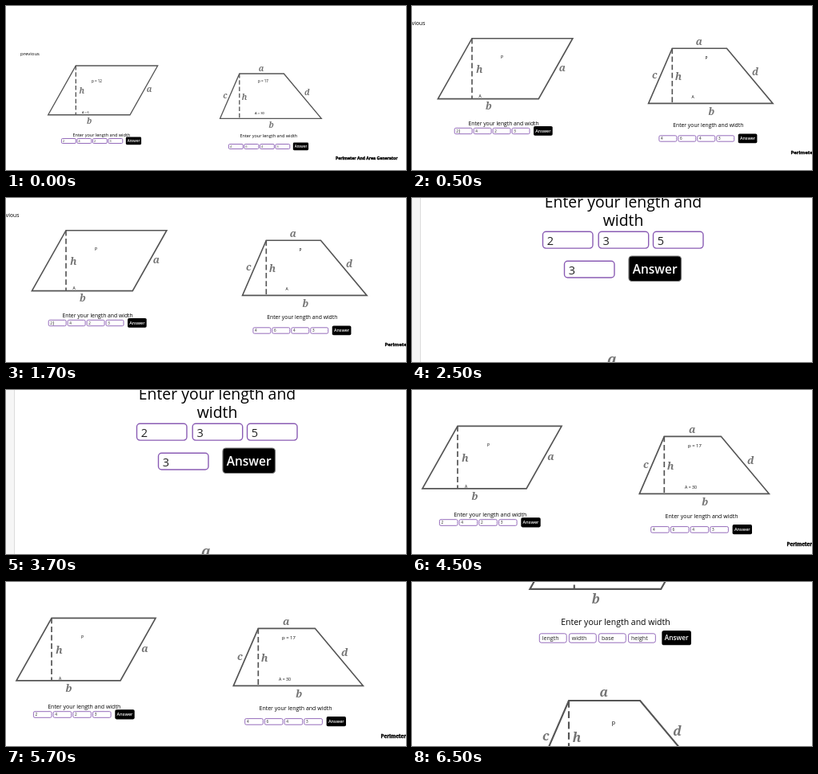
Write an HTML page that moves like this. It is 500 px wide and 206 px high and loops after 8000 ms.

```html
<!DOCTYPE html>
<html lang="en">
<head>
<meta charset="utf-8">
<title>Perimeter and area</title>
<style>
html, body { margin: 0; width: 100%; height: 100%; overflow: hidden; background: #fff; }
svg { display: block; width: 100vw; height: 100vh; }
text { font-family: "Trebuchet MS", "Open Sans", sans-serif; font-weight: 500; fill: #000; white-space: pre; }
.shape { fill: none; stroke: #555; }
.side { font-family: "Noto Serif", "Liberation Serif", serif; font-style: italic; font-weight: 600; fill: #747474; }
.box { fill: #fff; stroke: #8a5cb4; }
.value { fill: #222; }
.press { fill: #fff; font-weight: 600; }
.title { font-weight: 700; stroke: #000; stroke-width: 0.35px; }
</style>
</head>
<body>
<svg id="stage" viewBox="0 0 500 206" xmlns="http://www.w3.org/2000/svg"></svg>
<script>
const stage = document.getElementById("stage");
const LOOP = 8000;

const text = (x, y, size, str, extra = "") =>
  `<text x="${x}" y="${y}" font-size="${size}" ${extra}>${str}</text>`;
const middle = 'text-anchor="middle"';
const rect = (x, y, w, h, r, extra) =>
  `<rect x="${x}" y="${y}" width="${w}" height="${h}" rx="${r}" ${extra}/>`;

// Outline, dashed height and side letters, measured from the top-left corner.
function figure(x, y, s, points, height, sides) {
  const pts = points.map(([px, py]) => `${x + px * s},${y + py * s}`).join(" ");
  const size = 12.8 * s;
  const letters = sides.map(([c, px, py]) => {
    const drop = c === "a" || c === "c" ? 0.27 : 0.37;
    return text(x + px * s, y + py * s + drop * size, size, c, `class="side" ${middle}`);
  });
  return `<polygon class="shape" points="${pts}" stroke-width="${1.7 * s}"/>` +
    `<path class="shape" d="M${x} ${y}v${height * s}" stroke-width="${1.7 * s}" ` +
    `stroke-dasharray="${7 * s} ${3.6 * s}"/>` + letters.join("");
}

const parallelogram = (x, y, s) => figure(x, y, s,
  [[0, 0], [130, 0], [86, 78.5], [-44, 78.5]], 78.5,
  [["h", 9.5, 40], ["a", 116.5, 39], ["b", 21.5, 88]]);

const trapezoid = (x, y, s) => figure(x, y, s,
  [[0, 0], [71, 0], [131, 72], [-31, 72]], 72,
  [["a", 35, -7.5], ["c", -23, 36], ["h", 8, 37], ["d", 108, 30], ["b", 51, 82]]);

const field = (x, y, w, h, r, line) =>
  rect(x, y, w, h, r, `class="box" stroke-width="${line}"`);

// Prompt, four fields and the button.
function form(x, y, s, promptY, values) {
  let out = text(x + 63.7 * s, promptY, 7 * s, "Enter your length and width", middle);
  values.forEach((v, i) => {
    const left = x + i * 24.7 * s;
    out += field(left + 0.4, y, 22.6 * s, 7.6 * s, 1.6 * s, 0.9);
    out += text(left + 2.6 * s, y + 5.6 * s, 4.7 * s, v, 'class="value"');
  });
  const bx = x + 102.3 * s;
  return out + rect(bx, y - 2.5 * s, 24.4 * s, 12.2 * s, 1.8 * s, 'fill="#000"') +
    text(bx + 12.2 * s, y + 5.5 * s, 5.5 * s, "Answer", `class="press" ${middle}`);
}

const result = (x, y, size, str) => text(x, y, size, str, 'font-weight="600"');
const title = (x, y, size) =>
  text(x, y, size, "Perimeter And Area Generator", 'class="title"');

const trapValues = ["4", "6", "4", "3"];
const sideValues = ["2", "4", "2", "3"];

const solved = () =>
  text(18, 62, 6, "previous") +
  parallelogram(87.3, 75, 0.787) + trapezoid(291.8, 85, 0.782) +
  result(107, 95.5, 4.5, "p = 12") + result(95, 135, 3.8, "A = 6") +
  result(315, 95.5, 4.5, "p = 17") + result(311, 135.8, 4.2, "A = 30") +
  form(69, 166.5, 0.79, 164, sideValues) +
  form(278, 173.5, 0.79, 165, trapValues) +
  title(412, 193, 5.1);

const editing = () =>
  text(16.5, 24, 6.8, "previous", 'text-anchor="end"') +
  parallelogram(75, 40.7, 0.968) + trapezoid(325.3, 53.3, 0.96) +
  result(111, 65.5, 5, "P") + result(83.5, 115, 5, "A") +
  result(366.5, 66.5, 5, "P") + result(349.5, 116, 5, "A") +
  form(52.8, 153.3, 0.97, 150, sideValues) +
  '<path d="M59.3 154.8v5" stroke="#222" stroke-width=".6"/>' +
  form(308.5, 162.8, 0.97, 152, trapValues) +
  title(473.5, 186, 6);

function closeUp() {
  const entries = [[163.5, 42.3, "2"], [233.2, 42.3, "3"], [301.5, 42.3, "5"], [190.5, 79.2, "3"]];
  return rect(0, 0, 10, 206, 0, 'fill="#f6f6f6"') +
    rect(10, 0, 1, 206, 0, 'fill="#dcdcdc"') +
    text(264, 12, 19.4, "Enter your length and", middle) +
    text(264, 35, 19.4, "width", middle) +
    entries.map(([x, y, v]) => field(x, y, 62.5, 20.8, 4, 1.4) +
      text(x + 5.3, y + 16.6, 14.5, v, 'class="value"')).join("") +
    rect(271, 73, 65.5, 31.5, 4, 'fill="#000" stroke="#777" stroke-width="1.2"') +
    text(303.7, 95, 15.5, "Answer", `class="press" ${middle}`) +
    text(250, 208.5, 18, "a", `class="side" ${middle}`);
}

const partSolved = () =>
  parallelogram(57, 45.3, 1) + trapezoid(315.3, 58.3, 1) +
  result(94, 71.3, 5, "P") + result(66, 122.5, 5, "A") +
  result(345, 72, 5.9, "p = 17") + result(341, 123.5, 5.2, "A = 30") +
  form(34, 162.7, 1, 159, sideValues) +
  form(298.3, 171.6, 1, 161, trapValues) +
  title(468.5, 196, 6.3);

const stacked = () =>
  parallelogram(202.8, -90, 1.26) + trapezoid(196, 149, 1.255) +
  result(249.7, 178.5, 7, "p") +
  form(158.9, 64.8, 1.5, 54, ["length", "width", "base", "height"]);

// Hard cuts between views: [start, view].
const views = [
  [0, solved], [500, editing], [2500, closeUp], [4500, partSolved], [6500, stacked]
];
let current = null;

function draw(ms) {
  const t = ms % LOOP;
  const view = views.filter(([start]) => t >= start).pop()[1];
  if (view === current) return;
  current = view;
  stage.innerHTML = view();
}

const origin = performance.now();
function tick() {
  draw(performance.now() - origin);
  requestAnimationFrame(tick);
}
tick();
</script>
</body>
</html>
```
